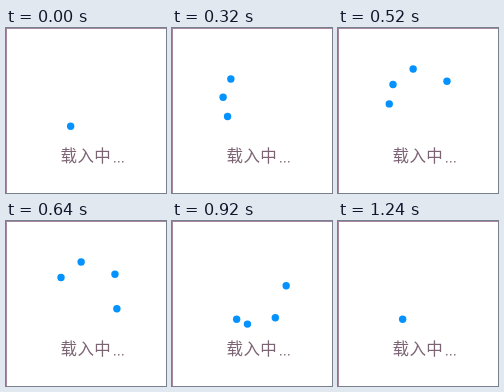
An HTML page for the animation above (1.6 s loop, 160 by 165 pixels).

```html
<!DOCTYPE html>
<html lang="zh">
<head>
<meta charset="utf-8">
<title>载入中</title>
<style>
html, body { margin: 0; width: 100%; height: 100%; overflow: hidden; background: #fff; }
svg { display: block; width: 160px; height: 165px; }
.edge { fill: none; stroke: #a588a0; }
.dot { fill: #0492ff; }
text { font: 500 16.5px "Noto Sans CJK SC", "Noto Sans CJK", sans-serif; letter-spacing: .4px; fill: #7d6474; }
.trail { fill: #8b7684; }
</style>
</head>
<body>
<svg viewBox="0 0 160 165">
  <path class="edge" d="M0 .5H160M.5 0V165"/>
  <text x="54.5" y="134">载入中</text>
  <g class="trail">
    <rect x="108" y="133" width="1.5" height="1.5"/>
    <rect x="112" y="133" width="1.5" height="1.5"/>
    <rect x="116" y="133" width="1.5" height="1.5"/>
  </g>
  <g id="ring"></g>
</svg>
<script>
const LOOP = 1600, TICK = 40, DELAY = 120, COUNT = 4;
const CX = 83, CY = 72, RADIUS = 32, START = 215;
// [ms, degrees travelled]: slow, fast, slow
const PATH = [[0, 0], [360, 108], [560, 222], [760, 328], [880, 360]];
const LAP = 880;

const ring = document.getElementById('ring');
const dots = Array.from({ length: COUNT }, () => {
  const dot = document.createElementNS('http://www.w3.org/2000/svg', 'circle');
  dot.setAttribute('class', 'dot');
  dot.setAttribute('r', 3.7);
  return ring.appendChild(dot);
});

function travel(t) {
  const i = PATH.findIndex(p => t < p[0]);
  if (i < 0) return 360;
  const [t0, a0] = PATH[i - 1], [t1, a1] = PATH[i];
  return a0 + (a1 - a0) * (t - t0) / (t1 - t0);
}

function draw(now) {
  const t = Math.floor((now % LOOP) / TICK) * TICK;
  dots.forEach((dot, i) => {
    const local = t - i * DELAY;
    // a parked dot makes way for the next one to arrive
    const covered = i < COUNT - 1 && local >= LAP + DELAY;
    const hidden = local < 0 || covered;
    dot.style.display = hidden ? 'none' : '';
    if (hidden) return;
    const a = (START + travel(local)) * Math.PI / 180;
    dot.setAttribute('cx', CX + RADIUS * Math.sin(a));
    dot.setAttribute('cy', CY - RADIUS * Math.cos(a));
  });
}

let origin;
function loop(now) {
  origin ??= now;
  draw(Math.max(0, now - origin));
  requestAnimationFrame(loop);
}
draw(0);
requestAnimationFrame(loop);
</script>
</body>
</html>
```
